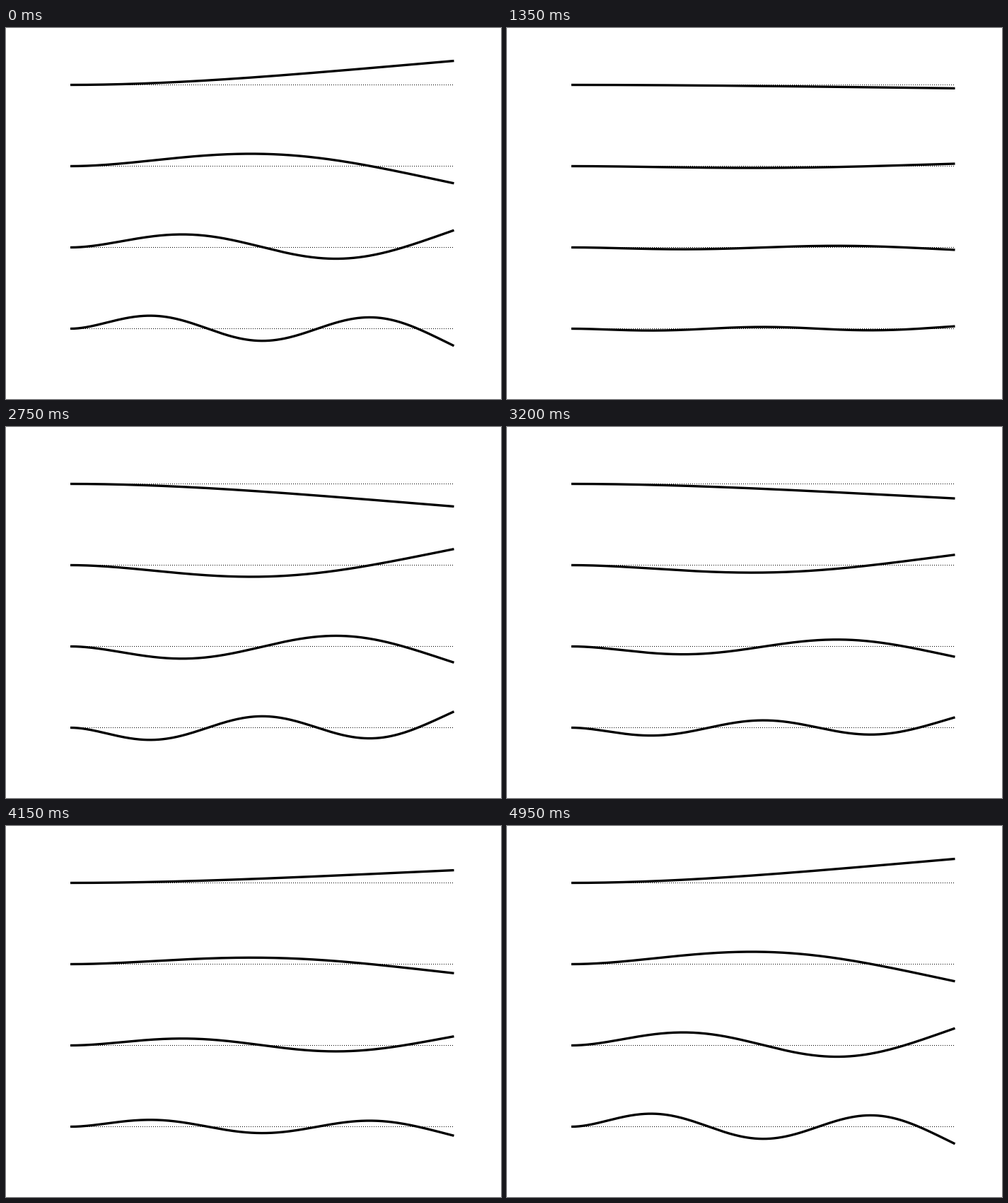
These frames come from a looping animation (700 by 525 pixels, 5 s). A matplotlib script:

```python
import numpy as np
import matplotlib.pyplot as plt
from matplotlib.animation import FuncAnimation

WIDTH, HEIGHT, DPI = 700, 525, 100
PX = 72 / DPI                 # one pixel in points
FRAMES, INTERVAL = 100, 50
LEFT, RIGHT = 91, 633.5
TOP, SPACING = 80.5, 115
ROOTS = [1.875104, 4.694091, 7.854757, 10.995541]   # cos(b) * cosh(b) = -1
TIP = [34, 24.3, 24.3, 24.3]  # tip amplitude in pixels


def mode_shape(b, s):
    """Vibration mode of a clamped-free beam, scaled to |1| at the tip."""
    sigma = (np.cosh(b) + np.cos(b)) / (np.sinh(b) + np.sin(b))
    z = b * s
    return (np.cosh(z) - np.cos(z) - sigma * (np.sinh(z) - np.sin(z))) / 2


fig = plt.figure(figsize=(WIDTH / DPI, HEIGHT / DPI), dpi=DPI, facecolor="white")
ax = fig.add_axes([0, 0, 1, 1])
ax.set_xlim(0, WIDTH)
ax.set_ylim(HEIGHT, 0)
ax.axis("off")

s = np.linspace(0, 1, 300)
x = LEFT + (RIGHT - LEFT) * s
beams = []
for i, (root, tip) in enumerate(zip(ROOTS, TIP)):
    rest = TOP + i * SPACING
    ax.plot([LEFT, RIGHT], [rest, rest], color="black", lw=PX,
            ls=(0, (1, 2)), dash_capstyle="butt", snap=False)
    line, = ax.plot(x, np.full_like(x, rest), color="black", lw=3.33 * PX,
                    solid_capstyle="butt", snap=False)
    beams.append((line, rest, tip * mode_shape(root, s)))


def update(k):
    swing = np.cos(2 * np.pi * k / (FRAMES - 1))
    for line, rest, shape in beams:
        line.set_ydata(rest - swing * shape)
    return [beam[0] for beam in beams]


anim = FuncAnimation(fig, update, frames=FRAMES, interval=INTERVAL,
                     repeat=True, repeat_delay=0)
plt.show()
```
